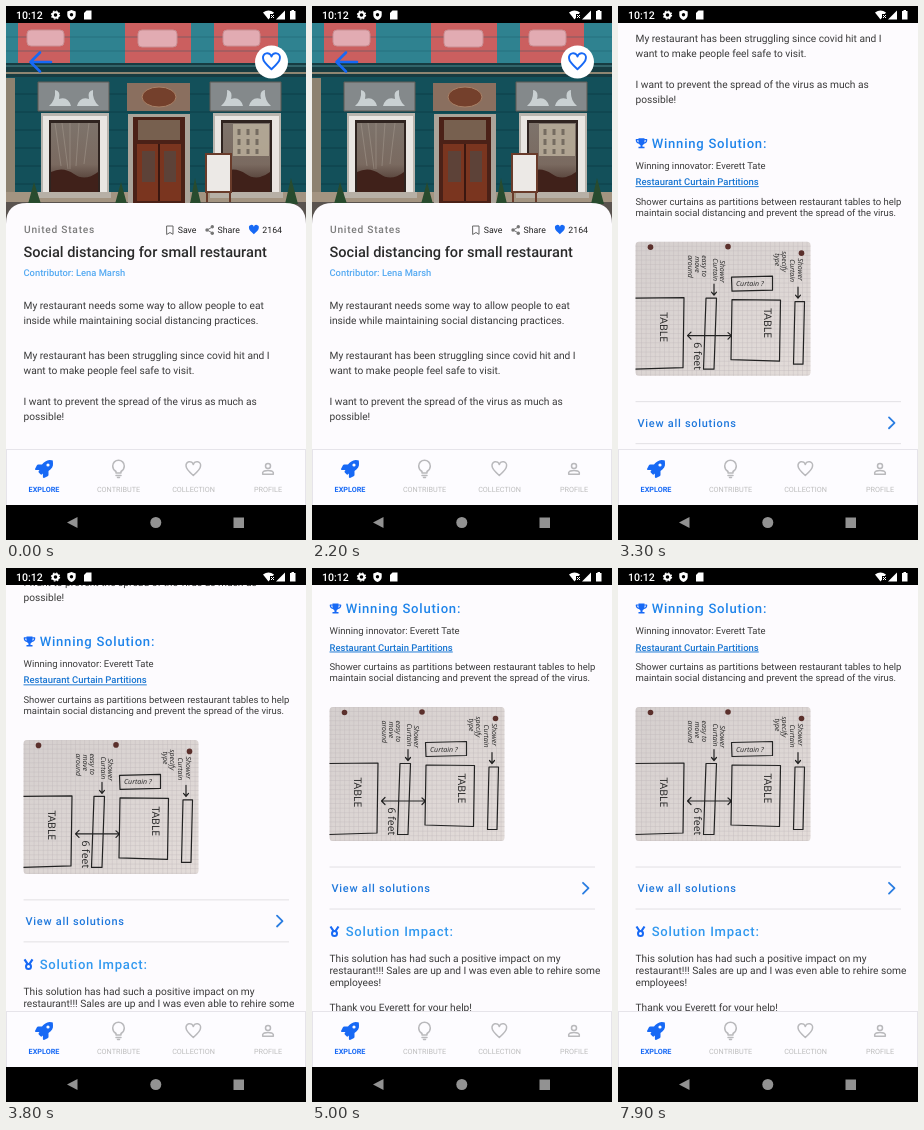
An HTML page that plays this animation: 300x534 px, repeating every 8000 ms.

```html
<!DOCTYPE html>
<html lang="en">
<head>
<meta charset="utf-8">
<title>Restaurant challenge</title>
<style>
html, body { margin: 0; width: 100%; height: 100%; overflow: hidden; background: #000; }
svg { display: block; width: 300px; height: 534px; }
text { font-family: Roboto, sans-serif; font-size: 10.2px; fill: #3a3a3a; text-rendering: geometricPrecision; }
.m { font-weight: 500; }
.place { letter-spacing: .75px; fill: #7c7c7c; }
.stat { font-size: 8.75px; fill: #222; }
.title { font-size: 14.55px; fill: #2a2a2a; }
.by { font-size: 9.4px; fill: #55aaf2; }
.small { font-size: 9.48px; }
.head { font-size: 13.1px; letter-spacing: .75px; fill: #1f84ea; }
.link { font-size: 9.48px; fill: #1976d2; text-decoration: underline; }
.all { font-size: 10.94px; letter-spacing: .73px; fill: #1f78dc; }
.tab { font-size: 7.25px; fill: #bdbdbd; text-anchor: middle; }
.clock { font-size: 10.6px; fill: #fff; }
.pen text { font: italic 7px "Open Sans", sans-serif; fill: #222; }
.pen .big { font-size: 10.5px; font-style: normal; }
.line { fill: none; stroke-linecap: round; stroke-linejoin: round; }
</style>
</head>
<body>
<svg viewBox="0 0 300 534">
  <defs>
    <path id="heart" d="M12 20C5 13.8 3 11.4 3 8.5A4.6 4.6 0 0 1 12 6.3A4.6 4.6 0 0 1 21 8.5C21 11.4 19 13.8 12 20z"/>
    <pattern id="grid" width="4.6" height="4.6" patternUnits="userSpaceOnUse">
      <path d="M0 0H4.6M0 0V4.6" stroke="#bdb5b8" stroke-width=".7"/>
    </pattern>
    <linearGradient id="glass" x2="0" y2="1">
      <stop stop-color="#7d736b"/><stop offset=".6" stop-color="#7a6a60"/><stop offset="1" stop-color="#3c241d"/>
    </linearGradient>
    <linearGradient id="paper" x2="1" y2="1">
      <stop stop-color="#d5cfce"/><stop offset="1" stop-color="#e3dcd9"/>
    </linearGradient>
    <clipPath id="sheet"><rect x="17.5" y="552.5" width="175" height="134" rx="3.5"/></clipPath>
    <g id="window">
      <path d="M0 31H68V112H0z" fill="#b9b5ae"/>
      <path d="M2 34H66V112H2z" fill="#e9e6e2"/>
      <path d="M8 38H59V110H8z" fill="#2f2420"/>
      <path d="M10 41H57V110H10z" fill="url(#glass)"/>
      <path d="M10 90Q22 84 33 92T57 90V110H10z" fill="#40211a"/>
      <path d="M-3 110H70V116H-3z" fill="#b7b0a6"/>
      <path d="M-3 0H68V29H-3z" fill="#84898b" stroke="#5f5a55"/>
      <path d="M8 24Q15 18 14 8Q20 9 18 17Q27 14 30 24zM58 24Q51 18 52 8Q46 9 48 17Q39 14 36 24z" fill="#c9d0d2"/>
    </g>
  </defs>
  <rect width="300" height="534" fill="#fdfbfe"/>

  <g id="page">
    <!-- storefront -->
    <rect y="17" width="300" height="205" fill="#13505a"/>
    <path d="M0 17H300V60H0z" fill="#2f8290"/>
    <path d="M12 17H64V60H12zM119 17H185V60H119zM208 17H272V60H208z" fill="#cb5f5f"/>
    <path d="M0 31H300M0 45H300" stroke="#1b5a66" stroke-width=".7" opacity=".6"/>
    <g fill="#e2abb2" stroke="#c98f93">
      <rect x="21" y="24" width="37" height="16" rx="4"/>
      <rect x="132" y="24" width="39" height="17" rx="4"/>
      <rect x="217" y="24" width="37" height="16" rx="4"/>
    </g>
    <rect y="57" width="300" height="14" fill="#173c42"/>
    <path d="M0 60H300" stroke="#4f8b90"/>
    <path d="M0 67H300" stroke="#8f8672" stroke-width="2"/>
    <path d="M0 88H300M0 106H300M0 124H300M0 142H300M0 160H300M0 178H300" stroke="#0d3e48"/>
    <path d="M0 72H9V190H0z" fill="#8d8270"/>
    <rect y="186" width="300" height="10" fill="#a39481"/>
    <rect y="196" width="300" height="26" fill="#59534f"/>
    <use href="#window" x="35" y="76"/>
    <use href="#window" x="207" y="76"/>
    <path d="M227 118H263V150H227z" fill="#c2b7a2" opacity=".75"/>
    <path d="M233 123V148M242 123V148M251 123V148" stroke="#756c61" stroke-width="3" stroke-dasharray="6 4"/>
    <path d="M49 117L55 160M56 117L62 163M64 117V163M73 117L70 160M83 117L78 158" stroke="#a79c91" opacity=".5"/>
    <path d="M121 77H184V105H121z" fill="#8a6f5f"/>
    <ellipse cx="153" cy="91" rx="17" ry="10" fill="#74402c" stroke="#a88066"/>
    <path d="M122 108H184V200H122z" fill="#aba49a"/>
    <path d="M127 111H179V200H127z" fill="#4b2117"/>
    <path d="M132 114H174V134H132z" fill="#77604f"/>
    <path d="M131 138H175V195H131z" fill="#7a351f"/>
    <path d="M136 145H149V176H136zM158 145H170V176H158z" fill="#5d4238"/>
    <path d="M153 138V195" stroke="#3a1710" stroke-width="2"/>
    <path d="M200 148H225V186H200z" fill="#ece9e6" stroke="#693b2a" stroke-width="2"/>
    <path d="M201 187V196M224 187V196" stroke="#693b2a" stroke-width="2"/>
    <path d="M22 198L28 176L35 198zM109 198L115 176L121 198zM184 198L189 172L195 198zM279 198L285 172L292 198z" fill="#284b2e"/>

    <g class="line" stroke="#1769f5">
      <path d="M45 56H25M34 46.500L24.500 56L34 65.500" stroke-width="2.600"/>
      <circle cx="265.500" cy="56" r="16.500" fill="#fff" stroke="none"/>
      <use href="#heart" transform="translate(254.300 44.700) scale(.93)" stroke-width="2.100"/>
    </g>

    <!-- challenge card -->
    <path d="M0 950V218Q0 197 21 197H279Q300 197 300 218V950z" fill="#fdfbfe"/>
    <text class="place m" x="18" y="227.300">United States</text>
    <path class="line" d="M161 220H167V228.300L164 226.500L161 228.300z" stroke="#666"/>
    <text class="stat" x="171.700" y="227">Save</text>
    <path d="M206.500 221L201 224L206.500 227" class="line" stroke="#757575"/>
    <g fill="#757575"><circle cx="206.300" cy="220.700" r="1.700"/><circle cx="201" cy="224" r="1.700"/><circle cx="206.300" cy="227.300" r="1.700"/></g>
    <text class="stat" x="211.500" y="227">Share</text>
    <use href="#heart" transform="translate(241.400 217.400) scale(.54)" fill="#1769f5"/>
    <text class="stat" x="256.300" y="227">2164</text>
    <text class="title m" x="17.500" y="250.700">Social distancing for small restaurant</text>
    <text class="by m" x="17.500" y="269.500">Contributor: Lena Marsh</text>
    <text x="17.500" y="303">My restaurant needs some way to allow people to eat</text>
    <text x="17.500" y="318.300">inside while maintaining social distancing practices.</text>
    <text x="17.500" y="353">My restaurant has been struggling since covid hit and I</text>
    <text x="17.500" y="368.300">want to make people feel safe to visit.</text>
    <text x="17.500" y="398.700">I want to prevent the spread of the virus as much as</text>
    <text x="17.500" y="414">possible!</text>

    <!-- winning solution -->
    <g transform="translate(17.500 448.500)">
      <path d="M3 .5H9V4Q9 7 7 7.500V9H9V10.500H3V9H5V7.500Q3 7 3 4z" fill="#1769f5"/>
      <path d="M3 2H.8Q.8 5 3.500 5.500M9 2H11.200Q11.200 5 8.500 5.500" class="line" stroke="#1769f5" stroke-width="1.200"/>
    </g>
    <text class="head m" x="33.700" y="458.500">Winning Solution:</text>
    <text class="small" x="17.500" y="479.500">Winning innovator: Everett Tate</text>
    <text class="link m" x="17.500" y="496">Restaurant Curtain Partitions</text>
    <text class="small" x="17.500" y="515.700">Shower curtains as partitions between restaurant tables to help</text>
    <text class="small" x="17.500" y="526.700">maintain social distancing and prevent the spread of the virus.</text>

    <g clip-path="url(#sheet)" class="pen">
      <rect x="17" y="552" width="176" height="135" fill="url(#paper)"/>
      <rect x="17" y="552" width="176" height="135" fill="url(#grid)"/>
      <g fill="#5b302c"><circle cx="32.500" cy="558" r="2.800"/><circle cx="110" cy="557.500" r="2.800"/><circle cx="183.500" cy="564" r="2.800"/></g>
      <g class="line" stroke="#222" stroke-width="1.200">
        <path d="M17 609L66 608.500L65 678.500L17 680M88 609H98.500L96 680H85.500zM114 610.500L162.500 611L161.500 672L113 670.500zM177 612.500H186.500L185 675H175.500zM113.500 588L154.500 587V601L114 602z"/>
        <path d="M70 646.500H113M73 643L69.500 646.500L73 650M110 643.500L113.500 646.500L110 650M96 595V606M93.500 603L96 606L98.500 603M180 598V609M177.500 606L180 609L182.500 606"/>
      </g>
      <text x="118" y="597">Curtain ?</text>
      <g id="notes"></g>
    </g>

    <path d="M17.500 712.500H283M17.500 754.500H283" stroke="#e2e0e4"/>
    <text class="all m" x="19.500" y="737.500">View all solutions</text>
    <path d="M271 728.300L276.500 733.700L271 739.100" class="line" stroke="#2a7de1" stroke-width="1.800"/>

    <g transform="translate(17.500 771.500)" fill="none" stroke="#1769f5">
      <path d="M1 .5L4 5M9 .5L6 5" stroke-width="2.200"/>
      <circle cx="5" cy="7.500" r="2.500" stroke-width="2"/>
    </g>
    <text class="head m" x="33.700" y="781.700" style="fill:#3299ef">Solution Impact:</text>
    <text x="17.500" y="807.500">This solution has had such a positive impact on my</text>
    <text x="17.500" y="819.500">restaurant!!! Sales are up and I was even able to rehire some</text>
    <text x="17.500" y="831.700">employees!</text>
    <text x="17.500" y="856.700">Thank you Everett for your help!</text>
  </g>

  <!-- status bar -->
  <rect width="300" height="17"/>
  <text class="clock m" x="10" y="13">10:12</text>
  <g fill="#fff">
    <circle cx="49.500" cy="9" r="2.800" fill="none" stroke="#fff" stroke-width="2"/>
    <circle cx="49.500" cy="9" r="4.100" fill="none" stroke="#fff" stroke-width="1.100" stroke-dasharray="1.620 1.600"/>
    <path d="M65.500 4L69.700 5.500V9Q69.500 12.500 65.500 14Q61.500 12.500 61.300 9V5.500z"/>
    <circle cx="65.500" cy="8.700" r="1.700" fill="#000"/>
    <path d="M80.500 4.500H85.500V13.500H78V7z"/>
    <path d="M257 6.500Q262.500 2.500 268 6.500L262.500 13.500z"/>
    <path d="M264 8H269V14H264z" fill="#000"/>
    <path d="M265 9L268 12M268 9L265 12" stroke="#fff"/>
    <path d="M279 4.500V13.500H270z"/>
    <path d="M284 5H285.500V4H288V5H289.500V13.500H284z"/>
  </g>

  <!-- tab bar -->
  <rect x=".5" y="443.500" width="299" height="56" fill="#fdfcff" stroke="#e6e4ea"/>
  <g transform="translate(29 454)" fill="#1769f5">
    <path d="M17.800 .6Q17.400 .2 14.500 0Q10 .5 7 4.500H3.300Q2.300 4.500 1.800 5.400L0 9Q0 10 .8 10.100H4.500L3.700 11Q3.200 12 4 12.800L5.500 14.300Q6.300 15 7.100 14.300L7.900 13.500V17.200Q8 18 9 18L12.600 16.200Q13.500 15.700 13.500 14.700V11Q18.500 7.500 18 3.500z"/>
    <circle cx="13" cy="5" r="1.600" fill="#fdfcff"/>
  </g>
  <g class="line" stroke="#b9b9bc" stroke-width="1.500">
    <path d="M110 467V465.500Q106.700 463.500 106.700 460A5.800 5.800 0 0 1 118.300 460Q118.300 463.500 115 465.500V467zM110 469.500H115M111.500 471.500H113.500"/>
    <use href="#heart" transform="translate(177.700 453.500) scale(.8)" stroke-width="1.900"/>
    <circle cx="262" cy="460" r="2.500"/>
    <path d="M256.700 468.300V466.500Q257.500 464.500 262 464.500T267.300 466.500V468.300z"/>
  </g>
  <text class="tab" x="38" y="485.500" style="fill:#1769f5;font-weight:700">EXPLORE</text>
  <text class="tab" x="112.500" y="485.500">CONTRIBUTE</text>
  <text class="tab" x="187.500" y="485.500">COLLECTION</text>
  <text class="tab" x="262" y="485.500">PROFILE</text>

  <rect y="499" width="300" height="35"/>
  <g fill="#929292"><path d="M61 516.500L71.500 511V522z"/><circle cx="149.800" cy="516.500" r="5.500"/><rect x="227.500" y="511.500" width="10.500" height="10.500"/></g>
</svg>
<script>
const LOOP = 8000, STEP = 100;
const page = document.getElementById('page');

// Sideways handwriting on the sketch: text, x, y, class
const notes = [
  ['TABLE', 42, 623, 'big'], ['TABLE', 145.5, 619, 'big'], ['6 feet', 76, 653, 'big'],
  ['Shower', 102, 571], ['Curtain', 94.5, 569],
  ['easy to', 84, 566], ['move', 77, 567], ['around', 70, 566],
  ['Shower', 179.5, 569], ['Curtain', 171.5, 570], ['specify', 163.5, 562], ['type', 156.5, 564]
];
document.getElementById('notes').innerHTML = notes.map(([s, x, y, c = '']) =>
  `<text class="${c}" transform="translate(${x} ${y}) rotate(90)">${s}</text>`).join('');

const part = (t, a, b) => Math.min(1, Math.max(0, (t - a) / (b - a)));

// A finger drag followed by a decelerating fling
function scrollAt(t) {
  const drag = part(t, 2300, 2800), fling = part(t, 2800, 4500);
  return 219.5 * drag * drag * (3 - 2 * drag) + 194 * (1 - (1 - fling) ** 2);
}

function draw() {
  const t = Math.floor(performance.now() % LOOP / STEP) * STEP;
  page.setAttribute('transform', `translate(0 ${-scrollAt(t)})`);
  requestAnimationFrame(draw);
}
draw();
</script>
</body>
</html>
```
